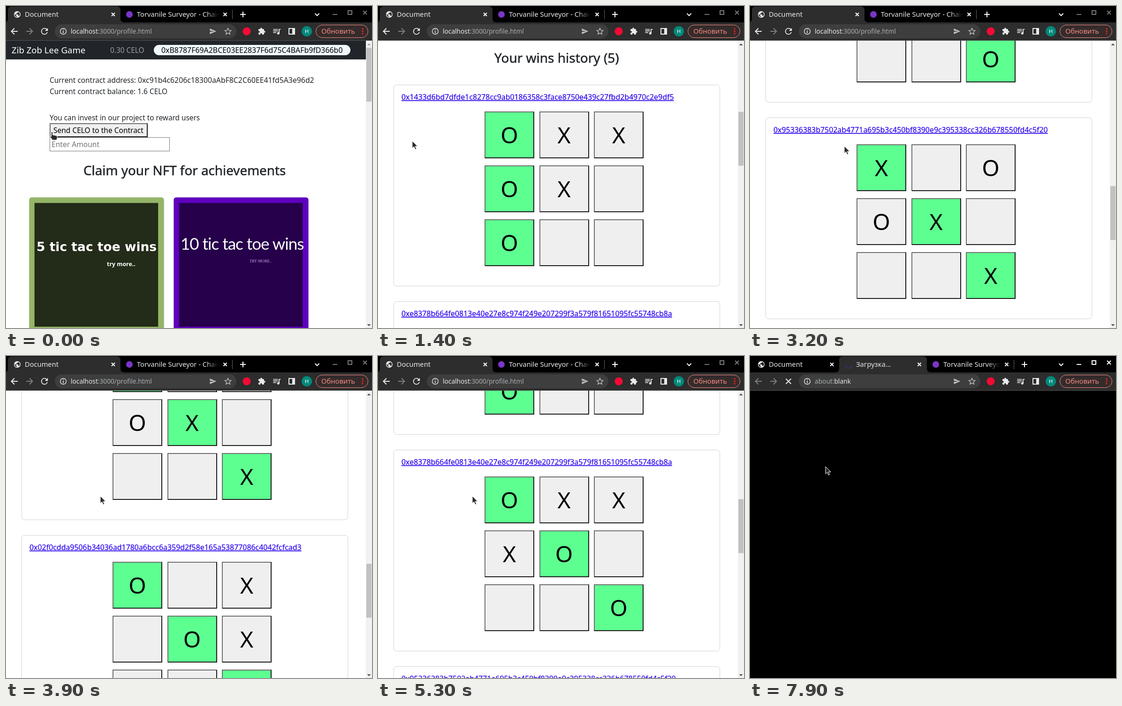
These frames come from a looping animation (780 by 687 pixels, 8 s). An HTML page:

```html
<!DOCTYPE html>
<html lang="en">
<head>
<meta charset="utf-8">
<title>Profile page</title>
<style>
html, body { margin: 0; height: 100%; overflow: hidden; background: #000; }
svg { display: block; }
text { font-family: "Noto Sans", "Open Sans", sans-serif; white-space: pre; }
.line { fill: none; stroke-width: 2; }
</style>
</head>
<body>
<svg id="stage" width="780" height="687" viewBox="0 0 780 687"></svg>
<script>
const LOOP = 8000, STEP = 100, OPEN = 6800;
const INK = '#212529', LIGHT = '#e8eaed', DIM = '#9aa0a6', BAR = '#2d2d2d';

// [time, scroll]
const SCROLL = [[0, 0], [600, 371], [700, 371], [1000, 530], [1100, 530], [1400, 736], [2000, 1060],
  [2400, 1272], [2700, 1272], [3200, 1590], [3500, 1802], [3700, 1802], [4100, 2014], [4200, 2014],
  [4500, 1804], [5100, 1272], [5300, 1166], [5400, 1166], [5800, 901], [5900, 901], [6200, 636]];
// [time, x, y]
const POINTER = [[0, 98, 269], [400, 73, 288], [2000, 73, 288], [2400, 201, 299],
  [7300, 201, 299], [7600, 196, 287], [7900, 161, 236]];

const WINS = [
  ['0x1433d6bd7dfde1c8278cc9ab0186358c3face8750e439c27fbd2b4970c2e9df5', 'OXXOX O  ', '036'],
  ['0xe8378b664fe0813e40e27e8c974f249e207299f3a579f81651095fc55748cb8a', 'OXXXO   O', '048'],
  ['0x95336383b7502ab4771a695b3c450bf8390e9c395338cc326b678550fd4c5f20', 'X OOX   X', '048'],
  ['0x02f0cdda9506b34036ad1780a6bcc6a359d2f58e165a53877086c4042fcfcad3', 'O X OX  O', '048']
];

const ICONS = {
  globe: 'M12 2a10 10 0 1 0 0 20 10 10 0 0 0 0-20zm-1 17.9A8 8 0 0 1 4.2 10.2L9 15v1a2 2 0 0 0 2 2zm6.9-2.5A2 2 0 0 0 16 16h-1v-3a1 1 0 0 0-1-1H8v-2h2a1 1 0 0 0 1-1V7h2a2 2 0 0 0 2-2v-.4a8 8 0 0 1 2.9 12.8z',
  reload: 'M17.65 6.35A7.96 7.96 0 0 0 12 4a8 8 0 1 0 7.73 10h-2.08A6 6 0 1 1 12 6c1.66 0 3.14.69 4.22 1.78L13 11h7V4z',
  send: 'M2 21l21-9L2 3v7l15 2-15 2z',
  puzzle: 'M20.5 11H19V7a2 2 0 0 0-2-2h-4V3.5a2.5 2.5 0 0 0-5 0V5H4a2 2 0 0 0-2 2v3.8h1.5a2.7 2.7 0 0 1 0 5.4H2V20a2 2 0 0 0 2 2h3.8v-1.5a2.7 2.7 0 0 1 5.4 0V22H17a2 2 0 0 0 2-2v-4h1.5a2.5 2.5 0 0 0 0-5z',
  queue: 'M15 6H3v2h12zm0 4H3v2h12zM3 16h8v-2H3zM17 6v8.18A3 3 0 1 0 19 17V8h3V6z'
};

const track = (keys, t, i = 1) => {
  const n = keys.findIndex(k => k[0] > t);
  if (n < 0) return keys[keys.length - 1][i];
  const a = keys[n - 1], b = keys[n];
  return a[i] + (b[i] - a[i]) * (t - a[0]) / (b[0] - a[0]);
};
const text = (x, y, size, str, fill = INK, more = '') =>
  `<text x="${x}" y="${y}" font-size="${size}" fill="${fill}" ${more}>${str}</text>`;
const medium = (x, y, size, str) => text(x, y, size, str, INK, `stroke="${INK}" stroke-width=".5"`);
const rect = (x, y, w, h, fill, r = 0, more = '') =>
  `<rect x="${x}" y="${y}" width="${w}" height="${h}" rx="${r}" fill="${fill}" ${more}/>`;
const disc = (x, y, r, fill, more = '') => `<circle cx="${x}" cy="${y}" r="${r}" fill="${fill}" ${more}/>`;
const line = (d, color, more = '') => `<path class="line" d="${d}" stroke="${color}" ${more}/>`;
const icon = (x, y, s, name, fill) =>
  `<path transform="translate(${x - 12 * s} ${y - 12 * s}) scale(${s})" d="${ICONS[name]}" fill="${fill}" fill-rule="evenodd"/>`;
const cross = (x, y, r, color) => line(`M${x - r} ${y - r}l${2 * r} ${2 * r}m0 ${-2 * r}l${-2 * r} ${2 * r}`, color);

// Raised button: grey top and left edges, dark bottom and right
const button = (x, y, w, h, fill) => rect(x, y, w, h, fill) +
  line(`M${x + 1} ${y + h}V${y + 1}H${x + w}`, '#707070') +
  line(`M${x + 1} ${y + h - 1}H${x + w - 1}V${y + 1}`, '#1c1c1c');
const frame = (x, y, w, h) => rect(x + .5, y + .5, w - 1, h - 1, '#fff', 6, 'stroke="#d2d2d2"');

function badge(x, outer, inner, art, title, label, labelW, fill, ink) {
  return frame(x, 408, 288, 390) +
    `<path d="M${x + .5} 695V414q0-5.5 5.500-5.500h276q5.500 0 5.500 5.500V695z" fill="${outer}"/>` +
    rect(x + 12, 420.500, 263, 263.500, inner, 0, 'stroke="#0003" stroke-width="1.500"') + art +
    medium(x + 17, 730, 19.5, title) + rect(x + 17, 743, labelW, 38, fill, 6) +
    text(x + 30, 768, 15.4, label, ink);
}

function winCard([hash, marks, won], n) {
  const top = 904 + n * 462;
  const cells = [...marks].map((mark, i) => {
    const x = 227 + (i % 3) * 116.500, y = top + 57 + Math.floor(i / 3) * 115;
    return button(Math.round(x), y, 106, 100, won.includes(i) ? '#5dff90' : '#efefef') +
      text(x + 53, y + 68, 48, mark, '#000', 'text-anchor="middle"');
  });
  return frame(33, top, 696, 430) +
    text(50, top + 32, 15.9, hash, '#2a06ee', 'text-decoration="underline" stroke="#2a06ee" stroke-width=".2"') +
    cells.join('');
}

const PAGE = rect(0, 74, 767, 40, INK) +
  text(12, 101, 18.6, 'Zib Zob Lee Game', '#fff') +
  text(222, 100, 15.4, '0.30 CELO', '#9b9d9f') +
  rect(315, 83, 419, 22, '#f0f8ff', 11) +
  text(331, 100, 15.9, '0xB8787F69A2BCE03EE2837F6d75C4BAFb9fD366b0', '#000') +
  text(93, 164, 15.4, 'Current contract address:') +
  text(281, 164, 15.8, '0xc91b4c6206c18300aAbF8C2C60EE41fd5A3e96d2') +
  text(93, 188, 15.4, 'Current contract balance: 1.6 CELO') +
  text(93, 244, 15.35, 'You can invest in our project to reward users') +
  button(93, 250, 209, 30, '#efefef') +
  text(101, 271, 15.5, 'Send CELO to the Contract', '#000') +
  rect(93.5, 280.5, 255, 29, '#fff', 0, 'stroke="#767676"') +
  text(97, 301, 15.6, 'Enter Amount', '#757575') +
  medium(165, 361, 27.8, 'Claim your NFT for achievements') +
  badge(49, '#94b566', '#232b19',
    text(65, 523, 26.5, '5 tic tac toe wins', '#fff', 'style="font-family:\'DejaVu Sans\',sans-serif" font-weight="700"') +
    text(215, 555, 12.4, 'try more..', '#fff', 'font-weight="700"'),
    '5 Wins', 'Claimed', 85, INK, '#fff') +
  badge(357, '#5f00c0', '#26004a',
    text(372, 520, 35, '10 tic tac toe wins', '#fff', 'style="font-family:Lato,sans-serif" letter-spacing="-1"') +
    text(519, 547, 9.1, 'TRY MORE..', '#c9a2e8', 'style="font-family:\'Liberation Serif\',serif" font-style="italic"'),
    '10 Wins', 'Need more wins', 143, '#fbfbfc', '#000') +
  medium(248, 857, 28, 'Your wins history (5)') +
  WINS.map(winCard).join('');

function page(t) {
  const y = Math.round(track(SCROLL, t));
  return rect(0, 74, 780, 613, '#fff') + `<g transform="translate(0 ${-y})">${PAGE}</g>` +
    rect(767, 74, 13, 613, '#f1f1f1') + rect(768, 89 + y / 5.385, 11, 115, '#c1c1c1') +
    `<path d="M769.500 84l4-4 4 4z" fill="${y ? '#505050' : '#a3a3a3'}"/><path d="M769.500 679l4 4 4-4z" fill="#505050"/>`;
}

function tabs(t, opened) {
  const p = Math.min(1, Math.max(0, (t - OPEN + 100) / 300));
  const edge = 244 - 54 * p, next = 244 + 133 * p, end = 483 + 80 * p;
  const [a, b] = opened ? [edge, next] : [4, 244];
  const win = opened ? '#fff' : '#777';
  const room = end - 30 - (next + 35);
  let s = rect(0, 0, 780, 35, '#000') +
    `<path d="M${a - 8} 35q8 0 8-8V9q0-8 8-8H${b - 8}q8 0 8 8V27q0 8 8 8z" fill="${BAR}"/>` +
    icon(24, 18, .7, 'globe', LIGHT) + text(40, 23, 14.67, 'Document', LIGHT) + cross(edge - 15.5, 18, 3.5, '#fff');
  if (opened) {
    s += line('M-7 1A7 7 0 0 0 7 1', '#38306e', `transform="translate(${edge + 20} 18) rotate(${(7900 - t) * .2})"`) +
      `<svg x="${edge + 36}" width="${Math.max(0, next - edge - 66)}" height="35">${text(0, 23, 14.67, 'Загрузка…', LIGHT)}</svg>` +
      cross(next - 16, 18, 3.5, '#fff');
  }
  return s + disc(next + 19, 18, 7, '#7b35c9') +
    `<svg x="${next + 35}" width="${room}" height="35">${text(0, 23, 14.67, 'Torvanile Surveyor - Chains', LIGHT)}` +
    rect(room - 26, 0, 26, 35, 'url(#fade)') + '</svg>' + cross(end - 16, 18, 3.5, '#fff') +
    rect(end - 1, 8, 1, 20, '#5f6368') + line(`M${end + 16} 18h12m-6-6v12`, '#fff') +
    line('M658.500 16l4.500 4.500 4.500-4.500', '#fff') + line('M696 18h10', win) +
    rect(729, 10, 8, 8, 'none', 0, `stroke="${win}" stroke-width="2"`) + cross(765, 14, 4, win);
}

function toolbar(opened) {
  const url = opened ? `about:<tspan fill="${LIGHT}">blank</tspan>` : `<tspan fill="${LIGHT}">localhost</tspan>:3000/profile.html`;
  return rect(0, 35, 780, 38, BAR) + rect(0, 73, 780, 1, '#545454') +
    line('M25 54H12m6-6.500l-6.500 6.500 6.500 6.500', opened ? '#7d7d7d' : LIGHT) +
    line('M43 54h13m-6-6.500l6.500 6.500-6.500 6.500', '#7d7d7d') +
    (opened ? cross(82, 54, 5.5, LIGHT) : icon(82, 54, .9, 'reload', LIGHT)) +
    rect(104, 39, 387, 30, '#3e3e3e', 15) +
    disc(122, 54, 6.3, 'none', `stroke="${LIGHT}" stroke-width="1.400"`) +
    line('M122 53v5m0-8v1.600', LIGHT, 'style="stroke-width:1.6"') +
    text(138, 59, 13.7, url, '#a8acb0') + icon(441, 54, .66, 'send', '#bdc1c6') +
    line('M473 47.500l2 4.400 4.700.5-3.500 3.200 1 4.600-4.200-2.400-4.200 2.400 1-4.600-3.500-3.200 4.700-.5z', '#bdc1c6', 'style="stroke-width:1.4"') +
    disc(513, 54, 8.5, '#f50a35') + icon(545, 54, .7, 'puzzle', LIGHT) + icon(577, 54, .85, 'queue', LIGHT) +
    rect(603, 48, 12, 12, 'none', 0, `stroke="${LIGHT}" stroke-width="2"`) + rect(610, 48, 5, 12, LIGHT) +
    disc(641, 54, 11, '#00897b') + text(641, 58, 11.5, 'H', '#fff', 'text-anchor="middle"') +
    rect(660.5, 40.5, 111, 27, '#352b2b', 13.5, 'stroke="#f28b82"') +
    text(672, 59, 14.67, 'Обновить', '#f28b82') +
    [49, 54, 59].map(y => disc(760, y, 1.7, '#e0261c')).join('');
}

function pointer(t) {
  const hand = t < 100 || (t >= 6200 && t < OPEN);
  const d = hand ? 'M-1.500 0q1.500-1.500 3 0V6l7.500 1.500q3 1 2.500 4L10 17H1l-5-7q0-2 2.500-.5z'
    : 'M0 0V15.500l3.600-3.400 2.600 6 2.600-1.200-2.600-5.600h5z';
  return `<path transform="translate(${track(POINTER, t)} ${track(POINTER, t, 2)})" d="${d}" fill="#2a2a2a" stroke="#fff"/>`;
}

const FADE = '<defs><linearGradient id="fade"><stop stop-color="#000" stop-opacity="0"/><stop offset="1"/></linearGradient></defs>';
const stage = document.getElementById('stage');
let shown = -1;

function tick(now) {
  const t = Math.floor(now % LOOP / STEP) * STEP;
  if (t !== shown) {
    shown = t;
    const opened = t >= OPEN;
    stage.innerHTML = FADE + (opened ? rect(0, 74, 780, 613, '#000') : page(t)) +
      tabs(t, opened) + toolbar(opened) + pointer(t);
  }
  requestAnimationFrame(tick);
}
tick(0);
</script>
</body>
</html>
```
